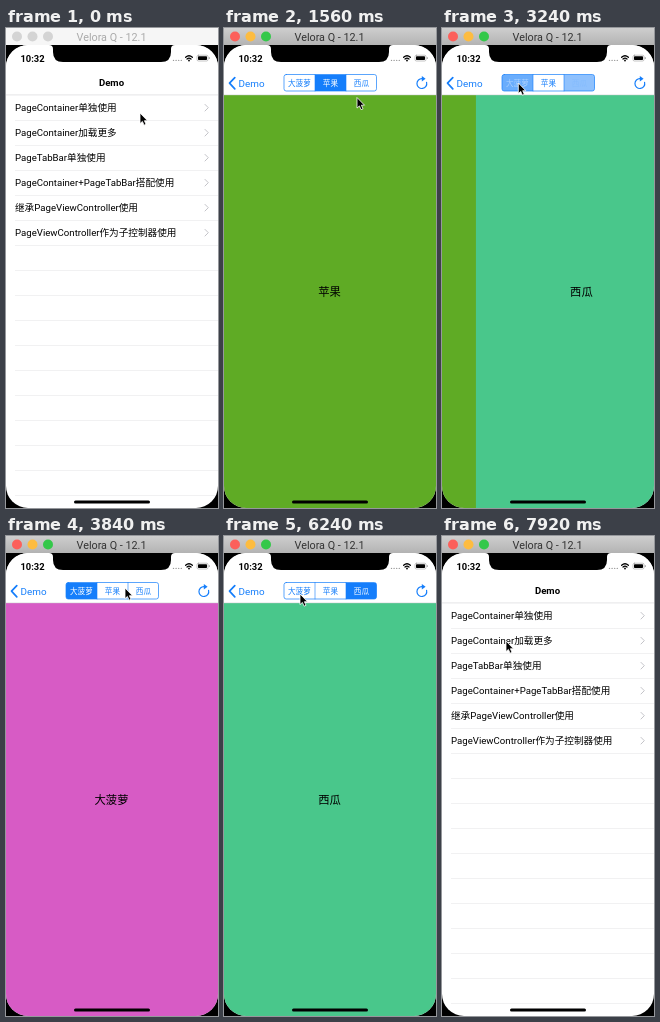
Animation, 212 px wide and 480 px high, one loop 8000 ms. Source, as an HTML page:

```html
<!DOCTYPE html>
<html lang="zh-CN">
<head>
<meta charset="utf-8">
<title>Demo</title>
<style>
html, body { margin: 0; width: 100%; height: 100%; overflow: hidden; background: #000; }
#stage { display: block; width: 100vw; height: 100vh; }
text { font-family: Roboto, "Noto Sans CJK SC", "Noto Sans CJK", sans-serif; white-space: pre; }
</style>
</head>
<body>
<svg id="stage" viewBox="0 0 212 480">
  <defs>
    <linearGradient id="barOn" x2="0" y2="1">
      <stop stop-color="#cecece"/><stop offset="1" stop-color="#b3b3b3"/>
    </linearGradient>
    <linearGradient id="shade">
      <stop stop-color="#000" stop-opacity="0"/><stop offset="1" stop-color="#000" stop-opacity=".12"/>
    </linearGradient>
    <clipPath id="screen"><rect y="17" width="212" height="463" rx="22"/></clipPath>
    <clipPath id="segShape"><rect x="60" y="46.5" width="92.5" height="16.5" rx="2.2"/></clipPath>
  </defs>
  <rect width="212" height="480"/>
  <g id="titleBar"></g>
  <g clip-path="url(#screen)">
    <rect y="17" width="212" height="463" fill="#fff"/>
    <g id="list"></g>
    <rect id="dim" y="67" width="212" height="413"/>
    <rect id="edge" y="67" width="5" height="413" fill="url(#shade)"/>
    <svg id="view" y="67" width="212" height="413" overflow="hidden"><g id="pages"></g></svg>
    <rect y="17" width="212" height="50" fill="#fff"/>
    <rect y="66.7" width="212" height=".5" fill="#c9c9cc"/>
    <g id="nav"></g>
    <g id="status"></g>
    <rect x="68" y="472.4" width="76" height="3" rx="1.5"/>
  </g>
  <path d="M43 17Q47 17 47 21V24Q47 34 57 34H155Q165 34 165 24V21Q165 17 169 17Z"/>
  <path id="cursor" d="M0 0V10.6L2.4 8.4L4.1 12.2L6 11.3L4.4 7.7H7.5Z" stroke="#fff" stroke-width=".8" stroke-linejoin="round"/>
</svg>
<script>
const LOOP = 8000, STEP = 120, W = 212, BLUE = '#157efb';
const $ = id => document.getElementById(id);

function add(parent, tag, attrs, content) {
  const el = document.createElementNS('http://www.w3.org/2000/svg', tag);
  set(el, attrs);
  if (content) el.textContent = content;
  return parent.appendChild(el);
}
function set(el, attrs) {
  for (const k in attrs) el.setAttribute(k, attrs[k]);
}
// Text whose capitals are centred on cy.
function label(parent, str, x, cy, size, attrs) {
  return add(parent, 'text', { x, y: cy + size * .36, 'font-size': size, ...attrs }, str);
}
const mid = { 'text-anchor': 'middle' };
const line = (stroke, width) => ({
  fill: 'none', stroke, 'stroke-width': width, 'stroke-linecap': 'round', 'stroke-linejoin': 'round'
});

// Window title bar
const bar = add($('titleBar'), 'rect', { width: W, height: 17 });
const lights = ['#fc605b', '#fdbc40', '#34c84a'].map((color, i) => ({
  color, el: add($('titleBar'), 'circle', { cx: 11 + 15.5 * i, cy: 8.5, r: 5 })
}));
const caption = label($('titleBar'), 'Velora Q - 12.1', 105.5, 8.8, 10.8, mid);

// Menu
const list = $('list');
const chosen = add(list, 'rect', { y: 67, width: W, height: 25, fill: '#d9d9d9' });
const items = ['PageContainer单独使用', 'PageContainer加载更多', 'PageTabBar单独使用',
  'PageContainer+PageTabBar搭配使用', '继承PageViewController使用', 'PageViewController作为子控制器使用'];
for (let i = 0; i < 16; i++) {
  const y = 79.7 + 25 * i;
  add(list, 'rect', { x: 9, y: y + 12.3, width: W, height: .5, fill: '#e2e2e4' });
  if (!items[i]) continue;
  label(list, items[i], 9, y, 9.65);
  add(list, 'path', { d: `M199 ${y - 3.3}l3.3 3.3l-3.3 3.3`, ...line('#c4c4c9', 1) });
}

// Pages
const pages = [['大菠萝', '#d75bc5'], ['苹果', '#5fab25'], ['西瓜', '#49c78b']];
pages.forEach(([name, fill], i) => {
  add($('pages'), 'rect', { x: W * i, width: W + .3, height: 413, fill });
  label($('pages'), name, W * i + 105.5, 197, 11.3, mid);
});

// Navigation bar
const nav = $('nav');
const heading = label(nav, 'Demo', 105.5, 55, 9.6, { ...mid, 'font-weight': 700 });
const back = add(nav, 'g');
add(back, 'path', { d: 'M10.8 49.6L5.5 55.2L10.8 60.8', ...line(BLUE, 1.7) });
const backText = label(back, 'Demo', 14.5, 55, 9.9, { fill: BLUE });
const reload = add(nav, 'g');
add(reload, 'path', { d: 'M202.6 54.4A4.9 4.9 0 1 1 198.2 50.7', ...line(BLUE, 1.2) });
add(reload, 'path', { d: 'M197.8 48L201.6 50.8L197.8 53.5Z', fill: BLUE });

const seg = add(nav, 'g');
const tabs = pages.map(([name], i) => ({
  bg: add(seg, 'rect', { x: 60 + 31 * i, y: 46.5, width: 31, height: 16.5, fill: BLUE, 'clip-path': 'url(#segShape)' }),
  text: label(seg, name, 75.4 + 31 * i, 54.9, 7.6, mid)
}));
add(seg, 'path', { d: 'M91 46.5V63M122 46.5V63', ...line(BLUE, .6) });
add(seg, 'rect', { x: 60, y: 46.5, width: 92.5, height: 16.5, rx: 2.2, ...line(BLUE, .7) });

// Status bar
const status = $('status');
label(status, '10:32', 26.5, 30.3, 9.4, { ...mid, 'font-weight': 700 });
for (let i = 0; i < 4; i++) add(status, 'circle', { cx: 167.5 + 2.6 * i, cy: 32.4, r: .7, fill: '#999' });
add(status, 'path', { d: 'M179.6 29.3Q183 26.2 186.4 29.3M181 31Q183 29.2 185 31', ...line('#000', 1.2) });
add(status, 'circle', { cx: 183, cy: 32.5, r: .9 });
add(status, 'rect', { x: 191, y: 27.2, width: 11, height: 5.8, rx: 1.5, ...line('#888', .5) });
add(status, 'rect', { x: 192, y: 28.2, width: 9, height: 3.8, rx: .7 });
add(status, 'rect', { x: 202.8, y: 29.2, width: .8, height: 1.8, fill: '#888' });

// Timing
const PRESS = 480, PUSH = 500, POP = 7052;
const slides = [[2445, 1, 2], [3180, 2, 0], [4185, 0, 1], [5330, 1, 2], [6440, 2, 0]]; // start, from, to
const path = [[0, 134, 85], [1320, 134, 85], [1800, 132, 54], [2700, 132, 54], [3000, 76, 55],
  [3600, 77, 55], [3840, 119, 52], [3960, 109, 54], [4700, 109, 54], [5040, 136, 54], [5700, 136, 54],
  [6060, 76, 58], [6720, 76, 58], [6960, 21, 55], [7200, 21, 55], [7560, 64, 122], [7800, 70, 116], [7920, 64, 105]];

const clamp = v => Math.max(0, Math.min(1, v));
const ease = p => p < .5 ? 2 * p * p : 1 - 2 * (1 - p) ** 2;
// Share of the way left in a critically damped move.
function spring(dt) {
  const a = Math.max(0, dt) * .0166, r = (1 + a) * Math.exp(-a);
  return r < .002 ? 0 : r;
}
function cursorAt(t) {
  const i = path.findIndex(k => k[0] > t);
  if (i < 0) return path[path.length - 1].slice(1);
  const [t0, x0, y0] = path[i - 1], [t1, x1, y1] = path[i];
  const p = ease((t - t0) / (t1 - t0));
  return [x0 + (x1 - x0) * p, y0 + (y1 - y0) * p];
}
function tint(a) {
  const c = [21, 126, 251].map(v => Math.round(v + (255 - v) * a));
  return `rgb(${c})`;
}
function tabState(t) {
  let scroll = 1, on = [0, 1, 0];
  for (const [start, from, to] of slides) {
    const dt = t - start;
    if (dt >= 0) {
      scroll = from + (to - from) * ease(clamp(dt / 300));
      on = [0, 0, 0];
      on[from] = 1 - clamp(dt / 115);
      on[to] = .2 + .8 * clamp(dt / 110);
    } else if (dt >= -120) {
      on[to] = .2;
    }
  }
  return { scroll, on };
}

function draw(t) {
  const active = t >= 360;
  set(bar, { fill: active ? 'url(#barOn)' : '#f6f6f6' });
  set(caption, { fill: active ? '#333' : '#aaa' });
  for (const { el, color } of lights) set(el, { fill: active ? color : '#d4d4d4' });

  const away = t < POP ? spring(t - PUSH) : 1 - spring(t - POP);
  const shown = 1 - away;
  set(list, { transform: `translate(${-.3 * W * shown})` });
  set(chosen, { opacity: t < PRESS ? 0 : 1 - clamp((t - POP) / 350) });
  set($('dim'), { opacity: .1 * shown });
  set($('edge'), { x: W * away - 5, opacity: shown });
  set($('view'), { x: W * away });

  const { scroll, on } = tabState(t);
  set($('pages'), { transform: `translate(${-W * scroll})` });
  tabs.forEach((tab, i) => {
    set(tab.bg, { opacity: on[i] });
    set(tab.text, { fill: tint(on[i] > .2 ? on[i] : 0) });
  });

  set(heading, { opacity: clamp(away * 1.6 - .6), transform: `translate(${-78 * shown})` });
  set(back, { opacity: clamp(shown * 1.2) * (t >= 6940 ? .28 : 1) });
  set(backText, { transform: `translate(${80 * away})` });
  set(seg, { opacity: clamp(shown * 1.3), transform: `translate(${122 * away})` });
  set(reload, { opacity: clamp(shown * 1.2) });
  set($('cursor'), { transform: `translate(${cursorAt(t)})` });
}

const begin = performance.now();
function tick() {
  const t = (performance.now() - begin) % LOOP;
  draw(Math.floor(t / STEP) * STEP);
  requestAnimationFrame(tick);
}
tick();
</script>
</body>
</html>
```
